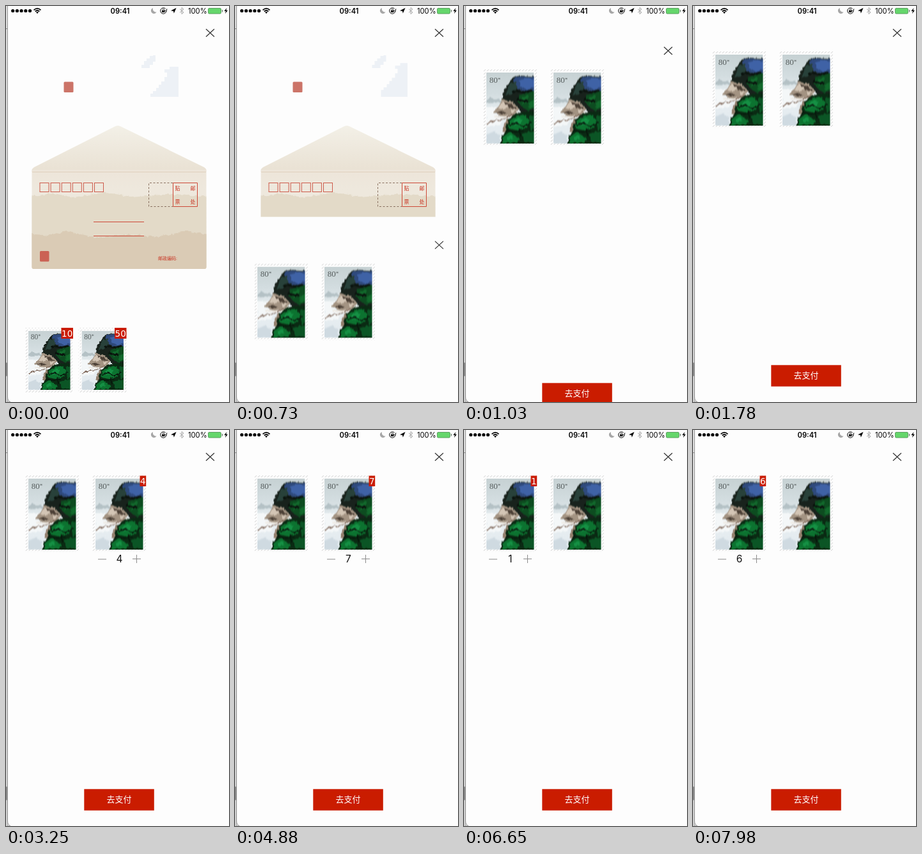
An HTML page for the animation above (8000 ms loop, 349 by 619 pixels).

```html
<!DOCTYPE html>
<html lang="zh">
<head>
<meta charset="utf-8">
<title>Stamps</title>
<style>
  html, body { margin: 0; width: 100%; height: 100%; overflow: hidden; background: #fdfdfd; }
  svg { display: block; }
  .status { font: 400 11.2px Inter, sans-serif; }
  .cjk { font-family: "Noto Sans CJK SC", "Noto Sans CJK", sans-serif; }
  .digits { font-family: "DejaVu Sans", sans-serif; text-anchor: middle; }
  .value { font-family: "Liberation Serif", serif; fill: #555c5c; }
</style>
</head>
<body>
<svg id="stage" width="349" height="619" viewBox="0 0 349 619">
  <defs>
    <filter id="rough" x="-5%" y="-5%" width="110%" height="110%" color-interpolation-filters="sRGB">
      <feTurbulence type="fractalNoise" baseFrequency=".16" numOctaves="3" seed="4"/>
      <feDisplacementMap in="SourceGraphic" scale="6" xChannelSelector="R" yChannelSelector="G"/>
    </filter>
    <filter id="ink" x="-5%" y="-5%" width="110%" height="110%" color-interpolation-filters="sRGB">
      <feTurbulence type="fractalNoise" baseFrequency=".22" numOctaves="2" seed="9"/>
      <feDisplacementMap in="SourceGraphic" scale="5" xChannelSelector="R" yChannelSelector="G"/>
      <feGaussianBlur stdDeviation=".8"/>
    </filter>
    <pattern id="perforation" width="5" height="5" patternUnits="userSpaceOnUse">
      <path d="M.8 4 4 .8" stroke="#cfcfcf"/>
    </pattern>
    <linearGradient id="sky" x2="0" y2="1">
      <stop stop-color="#c6d1d3"/><stop offset=".3" stop-color="#d3dde0"/>
      <stop offset=".6" stop-color="#e9eff2"/><stop offset="1" stop-color="#e1e9ee"/>
    </linearGradient>
    <linearGradient id="flap" x2="0" y2="1">
      <stop stop-color="#f3f0e7"/><stop offset="1" stop-color="#e9e1d3"/>
    </linearGradient>
    <linearGradient id="paper" x2="0" y2="1">
      <stop stop-color="#ede5d9"/><stop offset=".2" stop-color="#eee8dd"/>
    </linearGradient>
    <clipPath id="body"><rect x="40.5" y="256" width="273" height="155" rx="3"/></clipPath>
    <clipPath id="cloudBox"><rect x="200" y="70" width="70" height="72"/></clipPath>

    <symbol id="landscape" viewBox="0 0 75 111" preserveAspectRatio="none">
      <path fill="url(#sky)" d="M0 0H75V111H0z"/>
      <g filter="url(#ink)">
        <path fill="#b4c1c5" d="M0 44 7 38 13 42 20 41 24 46 0 47z"/>
        <path fill="#f4f7f8" d="M0 54H17L12 65 26 70 22 82 0 84z"/>
        <path fill="#cfdae1" d="M0 97 12 92 22 99 20 111H0z"/>
        <path fill="#a39382" d="M29 34 24 42 20 52 11 62 22 68 36 70 48 64 54 52 44 38z"/>
        <path fill="#d3c5b5" d="M25 45 19 56 28 58 38 52zM17 61 28 61 24 66zM38 58 48 57 40 64z"/>
        <path fill="#4c4036" d="M28 46 40 50 47 56 37 56zM14 62 24 60 34 64 24 65z"/>
        <path fill="#18221c" d="M42 8 52 5 80 6V61L68 63 56 62 48 53 42 46 24 42 27 31 34 18z"/>
        <path fill="#2f4a7d" d="M43 9 53 6 80 7V25L66 31 54 27 42 22z"/>
        <path fill="#3f62a6" d="M52 12 66 8 78 13V21L64 27 54 22z"/>
        <path fill="#28413a" d="M37 18 46 14 49 23 40 33 30 36z"/>
        <path fill="#0d4c20" d="M50 37 62 31 78 27V56L66 60 56 54 49 46z"/>
        <path fill="#12692c" d="M56 39 67 34 65 44 57 50zM67 47 78 41V53L67 57z"/>
        <path fill="none" stroke="#0a120d" stroke-width="3" d="M41 31 50 29 58 31 72 28M48 41 57 45 66 44"/>
        <path fill="none" stroke="#eee9e2" stroke-width="3" d="M12 69 28 70 42 68 50 63"/>
        <path fill="none" stroke="#73594a" stroke-width="1.400" d="M-2 81 12 75 27 73 38 67 50 65"/>
        <path fill="#927f6d" d="M34 71 27 82 25 92 31 94 38 82z"/>
        <path fill="#0a2a13" d="M36 72 46 65 58 61 80 61V115H22L24 100 32 92 30 84z"/>
        <path fill="#0c7330" d="M38 74 49 67 62 66 68 76 62 88 50 91 34 87zM26 101 36 93 47 98 52 106 46 110H25z"/>
        <path fill="#159044" d="M42 76 51 70 57 75 53 83 43 83zM32 100 40 97 43 104 33 106z"/>
        <path fill="#0b5525" d="M67 68 79 67V88L70 91zM56 96 68 92 79 94V109H60z"/>
        <path fill="none" stroke="#07180c" stroke-width="2" d="M37 82 48 79 58 85 70 77M52 87 54 100M31 91 46 93 58 91"/>
      </g>
    </symbol>
    <path id="close" d="M313 36 326 48M326 36 313 48" stroke="#333" stroke-width="1.2"/>
  </defs>

  <rect width="349" height="619" fill="#fdfdfd"/>

  <g id="letter">
    <g clip-path="url(#cloudBox)" fill="#edf1f6">
      <path id="smallCloud" d="M212 97V92H216V86H220V82H225V78H230V77H234V87H230V92H225V97z"/>
      <path id="largeCloud" d="M226 142V137H230V133H235V128H239V123H243V118H248V111H252V104H248V99H256V95H280V160H226z"/>
    </g>
    <rect x="90.5" y="118.5" width="15" height="16.5" rx="1.5" fill="#cc7468"/>
    <path d="M40.5 259V256Q41 254 44 252L170 188.500Q175 185.500 180 188.500L310 252Q313 254 313.500 256V259z" fill="url(#flap)"/>
    <g clip-path="url(#body)">
      <path d="M40 256H314V411H40z" fill="url(#paper)"/>
      <path d="M30 299 75 293 105 299 155 291 195 298 245 294 325 298V420H30z" fill="#e3dac8" filter="url(#rough)"/>
      <path d="M30 355 65 359 95 352 140 362 190 357 240 361 280 352 325 358V420H30z" fill="#dacbb5" filter="url(#rough)"/>
    </g>
    <path d="M41 259.500H313" stroke="#dfcfbd"/>
    <g id="postcode" fill="none" stroke="#cd5b4b"></g>
    <g fill="none" stroke="#cd4938">
      <path d="M137 337.500H216M137 359.500H216"/>
      <path d="M261.500 276.500H299.500V313.500H261.500z"/>
      <path d="M261 276.500H223.500V313.500H261" stroke="#89705f" stroke-dasharray="3 2.500"/>
    </g>
    <g class="cjk" fill="#c8311f" font-size="8">
      <text x="264.500" y="288">贴</text><text x="288.500" y="288">邮</text>
      <text x="264.500" y="308.500">票</text><text x="288.500" y="308.500">处</text>
      <text x="238" y="397" font-size="7">邮政编码:</text>
    </g>
    <rect x="53" y="383" width="14.500" height="16.500" rx="1.500" fill="#cb6254"/>
    <g id="smallStamps"></g>
    <use href="#close"/>
  </g>

  <g id="sheet">
    <rect y="-2" width="349" height="642" fill="#fdfdfd"/>
    <use href="#close"/>
    <g id="largeStamps"></g>
    <g id="counter" class="digits">
      <rect x="104.500" y="71.500" width="9.700" height="16.500" fill="#ca1c05"/>
      <text id="badge" x="109.400" y="84.500" font-size="13.500" fill="#fff"></text>
      <text id="amount" x="72.500" y="207" font-family="Inter, sans-serif" font-size="15.500" fill="#111"></text>
      <path d="M39 202H52M93 201.500H106M99.500 195V208" stroke="#8c8c8c"/>
    </g>
    <rect x="122.300" y="561.300" width="109.500" height="33.400" fill="#ca1c00"/>
    <text class="cjk" x="177" y="582" font-size="13" font-weight="300" fill="#fff" text-anchor="middle">去支付</text>
  </g>

  <g class="status">
    <g id="signal"></g>
    <g fill="none" stroke="#000" stroke-width="1.700">
      <path d="M43.500 6.300Q49 1.300 54.500 6.300M45.700 8.500Q49 5.500 52.300 8.500"/>
    </g>
    <path d="M47 9.700Q49 8.200 51 9.700L49 12z"/>
    <text x="178.500" y="11.500" font-weight="600" text-anchor="middle">09:41</text>
    <path d="M230 3A4.600 4.600 0 1 0 235.500 9.500A5 5 0 0 1 230 3z" fill="#a6a6a6"/>
    <path d="M249.500 4.200A4.600 4.600 0 1 0 250.800 8.500M251.800 4.500 250.800 8.500 248.500 6.500" fill="none" stroke="#000"/>
    <path d="M244 7H248.500V10H244z"/>
    <path d="M245 7V5.500Q246.200 4 247.500 5.500V7" fill="none" stroke="#000" stroke-width=".8"/>
    <path d="M266.500 3 262.800 11.500 262 8 258 7.200z"/>
    <path d="M272 4.700 278 10 275 12.500V2.500L278 5 272 10.300" fill="none" stroke="#a5a5a5"/>
    <text x="285" y="11.500">100%</text>
    <rect x="316.500" y="3.500" width="20" height="8.500" rx="1.500" fill="#65d66c" stroke="#4d8f52" stroke-width=".8"/>
    <path d="M338 6H339V9.500H338z" fill="#4d6650"/>
    <path d="M345.500 3 341.500 8H344L343 12 347 6.800H344.500z"/>
  </g>

  <path d="M0 0H2V619H0z" fill="#dedede"/>
  <path d="M0 35.500H2M0 558H2V578H0z" stroke="#858585" fill="#858585"/>
  <path d="M2.500 0V611Q2.500 617 7 619H2z" fill="#ddd" stroke="#999" stroke-width=".9"/>
</svg>
<script>
const LOOP = 8000;
const SLIDE = { start: 590, length: 600, distance: 619 };
const RIGHT = 105;

// [time, amount, counter offset]
const TAPS = [
  [0, 0, RIGHT],
  [2420, 1, RIGHT], [2680, 2, RIGHT], [2940, 3, RIGHT], [3200, 4, RIGHT],
  [3480, 5, RIGHT], [3760, 6, RIGHT], [4020, 7, RIGHT], [4280, 8, RIGHT],
  [4650, 7, RIGHT], [5000, 6, RIGHT], [5220, 5, RIGHT], [5440, 4, RIGHT],
  [5660, 3, RIGHT], [5880, 2, RIGHT], [6100, 1, RIGHT], [6320, 0, RIGHT],
  [6590, 1, 0], [6860, 2, 0], [7130, 3, 0], [7400, 4, 0], [7660, 5, 0], [7920, 6, 0]
];

const el = id => document.getElementById(id);
const repeat = (count, draw) => Array.from({ length: count }, (_, i) => draw(i)).join('');

function stamp(x, y, width, height, size) {
  return `<rect x="${x + 2}" y="${y + 2}" width="${width - 4}" height="${height - 4}"
      fill="none" stroke="url(#perforation)" stroke-width="4"/>
    <use href="#landscape" x="${x + 5}" y="${y + 5}" width="${width - 9.5}" height="${height - 9}"/>
    <text class="value" x="${x + size * .75}" y="${y + size * 1.6}" font-size="${size}">80<tspan
      font-size="${size * .7}" dy="-2">*</tspan></text>`;
}

function priceTag(x, price) {
  return `<rect x="${x}" y="503" width="18.5" height="17" fill="#ca1c05"/>
    <text class="digits" x="${x + 9.2}" y="516.500" font-size="13.500" fill="#fff">${price}</text>`;
}

el('signal').innerHTML = repeat(5, i => `<circle cx="${10.7 + i * 6.7}" cy="7.500" r="2.600"/>`);
el('postcode').innerHTML = repeat(6, i =>
  `<rect x="${53 + i * 17.1}" y="276.500" width="14" height="14"/>`);
el('smallStamps').innerHTML =
  stamp(30, 503, 75, 101, 11.5) + priceTag(86.5, 10) +
  stamp(113.5, 503, 75, 101, 11.5) + priceTag(170, 50);
el('largeStamps').innerHTML =
  stamp(30, 71, 84, 120, 13) + stamp(30 + RIGHT, 71, 84, 120, 13);

function move(id, x, y) {
  el(id).setAttribute('transform', `translate(${x} ${y})`);
}

function render(time) {
  const progress = Math.min(1, Math.max(0, (time - SLIDE.start) / SLIDE.length));
  move('sheet', 0, SLIDE.distance * (1 - progress) ** 2.33);

  const drift = Math.min(1, time / 880);
  move('smallCloud', 3 * drift, 0);
  move('largeCloud', 3 * drift, -7 * drift);

  const [, amount, offset] = TAPS.findLast(tap => tap[0] <= time);
  el('counter').style.display = amount ? '' : 'none';
  move('counter', offset, 0);
  el('badge').textContent = el('amount').textContent = amount;
}

const begin = performance.now();
function tick() {
  render((performance.now() - begin) % LOOP);
  requestAnimationFrame(tick);
}
tick();
</script>
</body>
</html>
```
